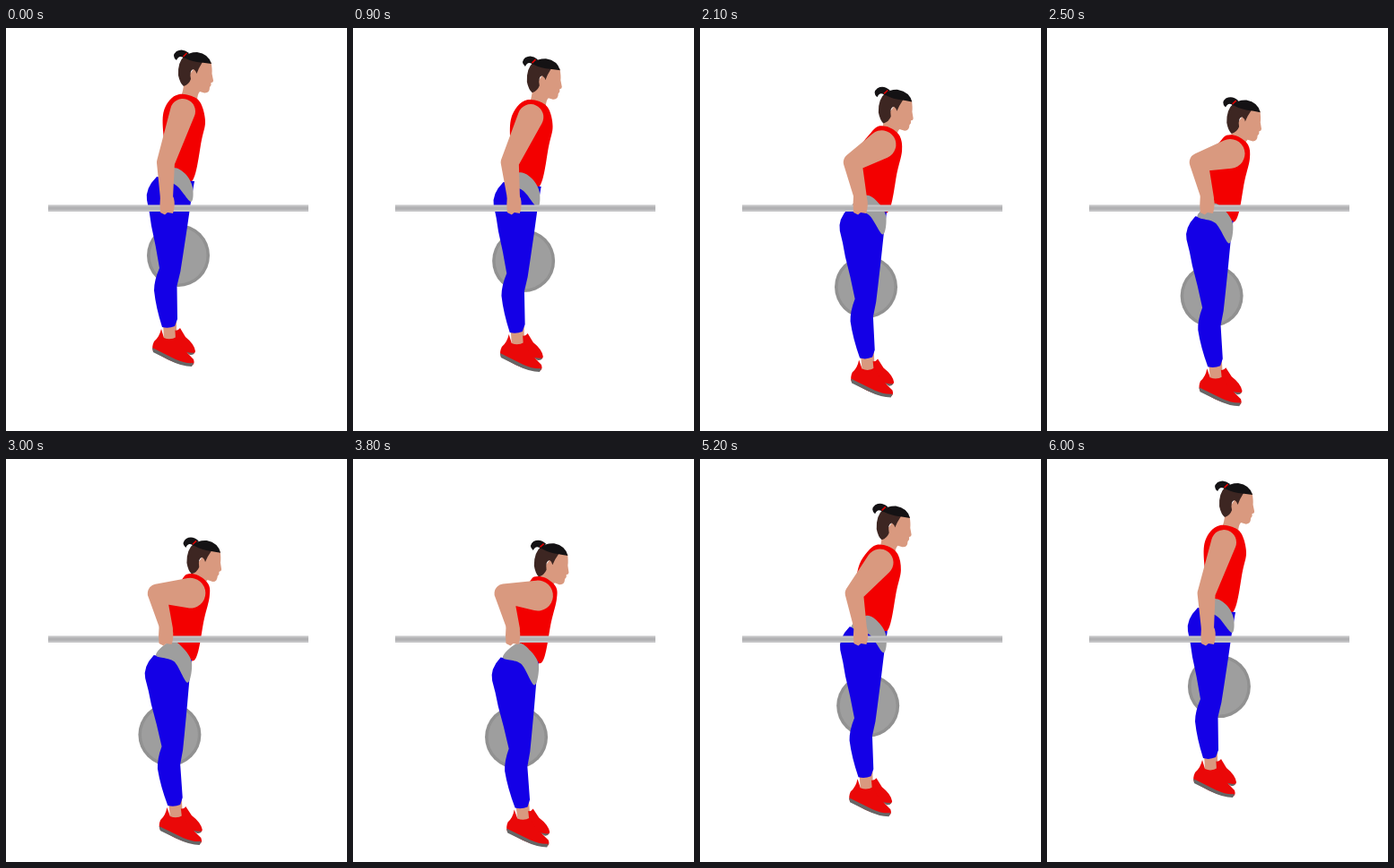
Animation, 380 px wide and 450 px high, one loop 6100 ms. Source, as an HTML page:

```html
<!DOCTYPE html>
<html lang="en">
<head>
<meta charset="utf-8">
<title>Barbell exercise</title>
<style>
  html, body { margin: 0; width: 100%; height: 100%; overflow: hidden; background: #fff; }
  svg { display: block; width: 380px; height: 450px; }
  .skin { fill: #d9997f; }
  .red { fill: #f30000; }
  .shoe { fill: #ea0808; }
  .blue { fill: #1400e6; }
  .sole { fill: #666; }
  .hair { fill: #141214; }
</style>
</head>
<body>
<svg viewBox="0 0 380 450">
  <g id="disc">
    <circle r="35" fill="#919191"/>
    <circle r="31.500" fill="#9e9e9e"/>
  </g>

  <g id="head">
    <path class="skin" d="M215 37L228.500 38Q230 46 229.500 51L231 58.500Q231 61 228.500 61L228.500 64L227 66Q227 73 221 72.500L216 71Q213 74 213 82L194 79Q198 70 198 61L206 50Z"/>
    <path fill="#3d2622" d="M199 31Q191 38 192 53Q194 62 198 65Q204 63 206 57Q204 47 209 46Q212 48 212.500 51L215 45L219 38Q207 36 199 31Z"/>
    <path class="hair" d="M198 32.500Q203 27 213 27Q226 29 229 40Q222 39 213 38Q203 36 198 32.500Z"/>
    <path class="hair" d="M199 34Q193 29 190 36Q184 31 190 26Q197 22 204 28Z"/>
    <path d="M197.500 32L201.500 28" stroke="#d00" stroke-width="1.600"/>
  </g>

  <path id="torso" class="red"/>

  <g id="legs">
    <path class="skin" d="M182 322H190V342H182Z"/>
    <path class="shoe" d="M187 337Q191 339 194 335L200 345Q210 353 211 361Q210 365 205 364L188 357Z"/>
    <path class="sole" d="M196 359Q204 364 210 362.500Q209 365.500 205 365Z"/>
    <path class="skin" d="M175 330H188L189 348Q182 352 176 347Z"/>
    <path class="shoe" d="M173 336L176 346Q183 349 190 345L195 355Q203 364 209 370Q211 376 206 377Q195 377 180 370L164 361Q162 356 165 350Q171 345 173 336Z"/>
    <path class="sole" d="M163 357Q175 363 189 370Q200 375 209 374L207 378Q196 378 182 371L164 362Z"/>
    <path class="blue" d="M168 166Q155 179 157 192Q160 205 162 221Q167 243 171 268Q165 282 165 293Q167 312 174 334Q181 336 188 333L191 325L190.500 288Q195 272 197 255L202 222L206 194L210 171L190 170Z"/>
  </g>

  <path id="sash" fill="#9e9e9e"/>

  <rect x="47" y="197.500" width="290" height="7.500" fill="#c4c4c6"/>
  <rect x="47" y="199.500" width="290" height="3.500" fill="#b1b1b3"/>

  <path id="arm" class="skin"/>
  <path id="hand" class="skin" d="M172 187Q171 197 172 206L177 208.500L180 206L186 207Q189 198 187 190L184 184H174Z"/>
</svg>
<script>
const LOOP = 6100, STEP = 100;
const el = id => document.getElementById(id);
const mix = (a, b, k) => a.map((v, i) => v + (b[i] - v) * k);

// Outlines as x, y pairs: [top of the move, bottom of the move]
const TORSO = [
  [193,74, 182,81, 175,97, 176,124, 181,152, 188,165, 208,170, 218,125, 222,104, 217,84, 207,76],
  [202,132, 195,140, 182,152, 172,160, 177,182, 187,208, 210,228, 221,182, 227,157, 226,143, 214,133]
];
const SASH = [
  [170,166, 186,156, 200,163, 208,178, 206,194, 190,176],
  [167,222, 184,206, 198,215, 207,231, 202,253, 187,229]
];

// Closed smooth curve through all points
function curve(v) {
  const n = v.length / 2;
  const at = i => { const k = (i + n) % n * 2; return [v[k], v[k + 1]]; };
  let d = 'M' + at(0);
  for (let i = 0; i < n; i++) {
    const [a, b, c, e] = [at(i - 1), at(i), at(i + 1), at(i + 2)];
    const c1 = b.map((x, j) => x + (c[j] - a[j]) / 6);
    const c2 = c.map((x, j) => x - (e[j] - b[j]) / 6);
    d += `C${c1} ${c2} ${c}`;
  }
  return d + 'Z';
}

// Tapered limb around two circles [x, y, r], the first one larger
function limb([ax, ay, ar], [bx, by, br]) {
  const dir = Math.atan2(by - ay, bx - ax);
  const open = Math.acos((ar - br) / Math.hypot(bx - ax, by - ay));
  const on = (x, y, r, a) => `${x + r * Math.cos(a)} ${y + r * Math.sin(a)}`;
  return `M${on(ax, ay, ar, dir + open)}L${on(bx, by, br, dir + open)}` +
    `A${br} ${br} 0 0 0 ${on(bx, by, br, dir - open)}L${on(ax, ay, ar, dir - open)}` +
    `A${ar} ${ar} 0 1 0 ${on(ax, ay, ar, dir + open)}Z`;
}

const ease = x => (1 - Math.cos(Math.PI * Math.min(1, Math.max(0, x)))) / 2;

// 0 = arms straight, 1 = lowest position
const depth = t => t < 3500
  ? ease((t - 200) / 3300)
  : 1 - ease(((t - 3500) / 2550) ** 1.35);

function draw(p) {
  const set = (id, name, value) => el(id).setAttribute(name, value);
  const drift = 10 * p ** .75;
  const lean = .06 * p;

  const shoulder = mix([197, 93, 14], [206, 153, 17], p);
  const elbow = [178 - 10 * Math.sqrt(p), 150, 10 + p / 2];
  const wrist = [179, 190, 7];

  set('arm', 'd', limb(shoulder, elbow) + limb(elbow, wrist));
  set('torso', 'd', curve(mix(...TORSO, p)));
  set('sash', 'd', curve(mix(...SASH, p)));
  set('disc', 'transform', `translate(${192 - drift} ${254 + 57 * p})`);
  set('head', 'transform', `translate(${drift} ${67.5 * p}) rotate(${3 * p} 208 50)`);
  set('hand', 'transform', `translate(${-1.5 * p} 0)`);
  set('legs', 'transform', `matrix(1 0 ${lean} 1 ${-2 * p - 190 * lean} ${56 * p})`);
}

const start = performance.now();
function tick(now) {
  const t = Math.max(0, now - start) % LOOP;
  draw(depth(Math.floor(t / STEP) * STEP));
  requestAnimationFrame(tick);
}
draw(0);
requestAnimationFrame(tick);
</script>
</body>
</html>
```
